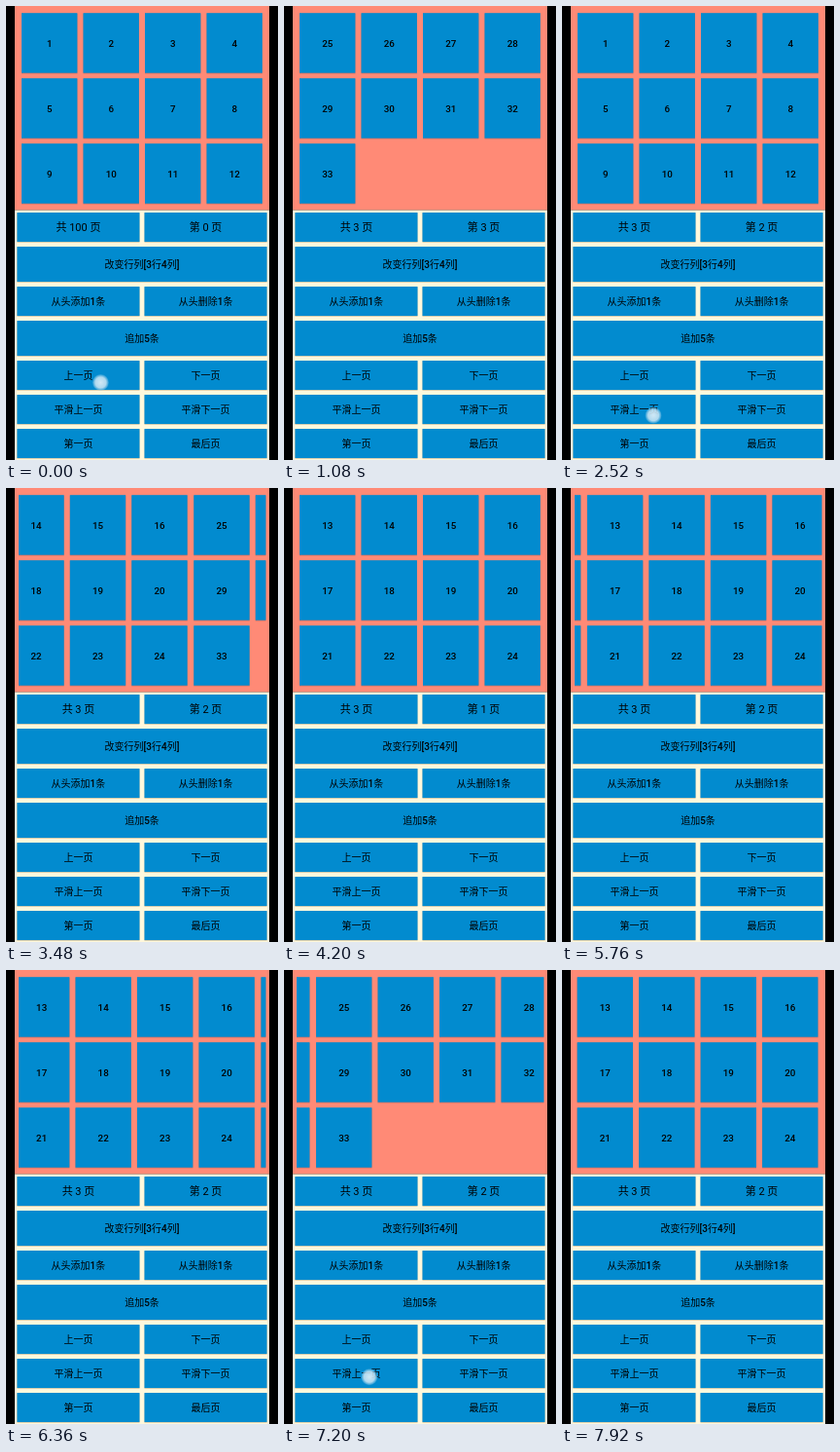
An HTML page with a canvas for the animation above (8000 ms loop, 280 px wide and 466 px high).

```html
<!DOCTYPE html>
<html lang="zh-CN">
<head>
<meta charset="utf-8">
<style>
html, body { margin: 0; width: 100%; height: 100%; overflow: hidden; background: #000; }
canvas { display: block; width: 280px; height: 466px; }
</style>
</head>
<body>
<canvas id="stage"></canvas>
<script>
const W = 280, H = 466, LOOP = 8000, STEP = 120;
const BLUE = '#028bcf', SALMON = '#ff8a76', CREAM = '#fff8dc', INK = '#000';
const FACE = 'Roboto, "Noto Sans CJK SC", "Noto Sans CJK", sans-serif';
const COLS = 4, ROWS = 3, ITEMS = 33;
const PER_PAGE = COLS * ROWS, PAGES = Math.ceil(ITEMS / PER_PAGE);
const PAGE_W = 254.5, SCROLL_MS = 750, PRESS_MS = 120;
const GAP = 5, EDGE = { left: 11.4, right: 268.6 };

const canvas = document.getElementById('stage');
const ctx = canvas.getContext('2d');
const dpr = window.devicePixelRatio || 1;
canvas.width = W * dpr;
canvas.height = H * dpr;

const rows = [
  ['改变行列[3行4列]'],
  ['从头添加1条', '从头删除1条'],
  ['追加5条'],
  ['上一页', '下一页'],
  ['平滑上一页', '平滑下一页'],
  ['第一页', '最后页']
];

// What the user does: button taps, and swipes on the grid
const actions = [
  { at: 0, tap: '上一页' },
  { at: 240, tap: '下一页' },
  { at: 600, tap: '第一页' },
  { at: 960, tap: '最后页' },
  { at: 1560, tap: '第一页' },
  { at: 2520, tap: '平滑上一页' },
  { at: 3300, swipe: 1 },
  { at: 3440, swipe: -1 },
  { at: 4200, swipe: -1 },
  { at: 5158, swipe: 1 },
  { at: 5772, swipe: 1 },
  { at: 5880, swipe: -1 },
  { at: 6644, swipe: 1 },
  { at: 7200, tap: '平滑上一页' }
];

const clampPage = n => Math.max(1, Math.min(PAGES, n));

function scrollPos({ from, to, start }, t) {
  const left = 1 - Math.min(1, (t - start) / SCROLL_MS);
  return to + (from - to) * left * left;
}

// Replays the actions up to t; plain buttons jump on release, the rest glide
function stateAt(t) {
  let index = 0, total = 100;
  let scroll = { from: 1, to: 1, start: 0 };
  for (const { at, tap = '', swipe } of actions) {
    const glides = swipe || tap.startsWith('平滑');
    const start = glides ? at : at + PRESS_MS;
    if (start > t) break;
    total = PAGES;
    if (tap === '第一页') {
      // returns to the start without touching the page counter
      scroll = { from: 1, to: 1, start };
      continue;
    }
    const step = swipe || (tap.includes('上') ? -1 : 1);
    index = tap === '最后页' ? PAGES : clampPage(index + step);
    const from = glides ? scrollPos(scroll, start) : index;
    scroll = { from, to: index, start };
  }
  return { index, total, page: scrollPos(scroll, t) };
}

// Stacks rows of one or two equal buttons
function layout(list, y) {
  const boxes = [];
  for (const row of list) {
    const h = row.length === 1 ? 36 : 30;
    const span = EDGE.right - EDGE.left + GAP;
    const w = span / row.length - GAP;
    row.forEach((text, i) => boxes.push({ text, x: EDGE.left + i * (w + GAP), y, w, h }));
    y += h + GAP;
  }
  return boxes;
}

const counterBoxes = layout([['total', 'index']], 212);
const buttons = layout(rows, 247);

function rect(x, y, w, h, color) {
  ctx.fillStyle = color;
  ctx.fillRect(x, y, w, h);
}

function label(text, x, y, size, weight) {
  ctx.font = `${weight} ${size}px ${FACE}`;
  ctx.textAlign = 'center';
  ctx.fillStyle = INK;
  ctx.fillText(text, x, y + size * 0.36);
}

function panel({ x, y, w, h }, shade) {
  rect(x, y + 0.8, w, h, shade);
  rect(x, y, w, h, BLUE);
}

function drawGrid(page) {
  rect(9, 0, 262, 209.5, SALMON);
  ctx.save();
  ctx.beginPath();
  ctx.rect(13, 0, PAGE_W, 209);
  ctx.clip();
  for (let i = 0; i < ITEMS; i++) {
    const p = Math.floor(i / PER_PAGE) + 1, k = i % PER_PAGE;
    const x = 16 + (k % COLS) * 63.5 + (p - page) * PAGE_W;
    const y = 7.2 + Math.floor(k / COLS) * 67;
    panel({ x, y, w: 57.4, h: 61.5 }, 'rgba(120,70,70,.35)');
    label(i + 1, x + 28.7, y + 31, 9.8, 500);
  }
  ctx.restore();
}

function drawButtons({ index, total }) {
  const shade = 'rgba(120,105,60,.35)';
  rect(9, 209.5, 262, H - 209.5, CREAM);
  const counters = [`共 ${total} 页`, `第 ${index} 页`];
  counterBoxes.forEach((box, i) => {
    panel(box, shade);
    label(counters[i], box.x + box.w / 2, box.y + 15.5, 11, 400);
  });
  for (const box of buttons) {
    panel(box, shade);
    label(box.text, box.x + box.w / 2, box.y + box.h / 2 + 0.3, 10, 500);
  }
}

function drawTouch(x, y) {
  const glow = ctx.createRadialGradient(x, y, 0, x, y, 8.5);
  glow.addColorStop(0, 'rgba(225,240,248,.92)');
  glow.addColorStop(0.65, 'rgba(200,228,243,.88)');
  glow.addColorStop(0.8, 'rgba(150,205,233,.75)');
  glow.addColorStop(1, 'rgba(150,205,233,.15)');
  ctx.fillStyle = glow;
  ctx.beginPath();
  ctx.arc(x, y, 8.5, 0, Math.PI * 2);
  ctx.fill();
}

function drawPresses(t) {
  for (const { at, tap } of actions) {
    if (!tap || t < at || t >= at + PRESS_MS) continue;
    const box = buttons.find(b => b.text === tap);
    // the finger lands closer to the middle as time goes on
    drawTouch(box.x + box.w / 2 + 23 - at / 750, box.y + box.h / 2 + 7.5 - at / 1900);
  }
}

function draw(t) {
  ctx.setTransform(dpr, 0, 0, dpr, 0, 0);
  rect(0, 0, W, H, '#000');
  const state = stateAt(t);
  drawGrid(state.page);
  drawButtons(state);
  drawPresses(t);
}

// The screen refreshes in fixed steps
function tick() {
  const t = performance.now() % LOOP;
  draw(Math.floor(t / STEP) * STEP);
  requestAnimationFrame(tick);
}
tick();
</script>
</body>
</html>
```
